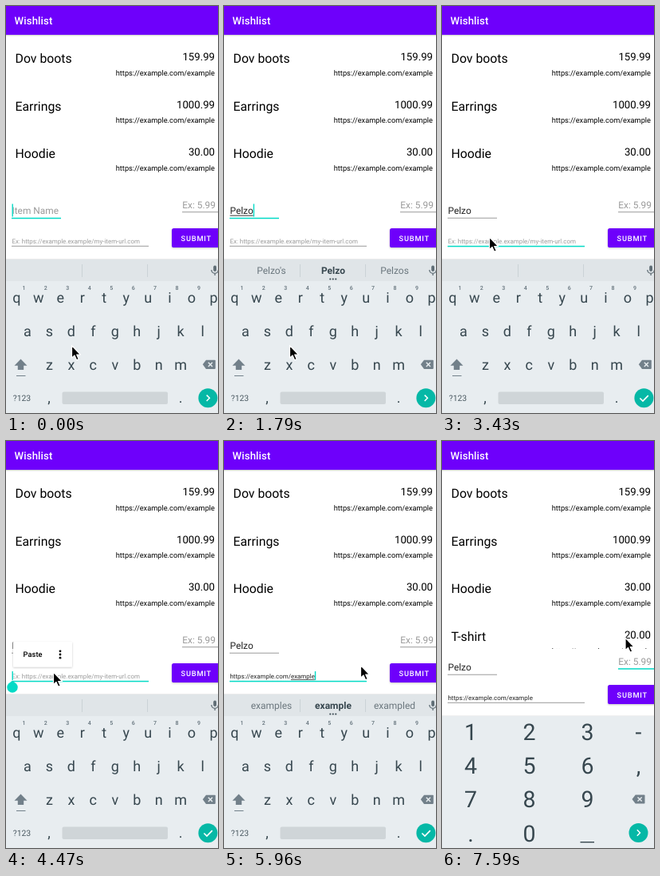
An HTML page that plays this animation: 266 by 509 pixels, repeating every 8 s.

```html
<!DOCTYPE html>
<html lang="en">
<head>
<meta charset="utf-8">
<title>Wishlist</title>
<style>
  html, body { margin: 0; width: 100%; height: 100%; overflow: hidden; background: #fff; }
  svg { display: block; width: 100vw; height: 100vh; font-family: Roboto, "Open Sans", sans-serif; }
  text { white-space: pre; text-rendering: geometricPrecision; }
  .mid { text-anchor: middle; }
  .end { text-anchor: end; }
  .medium { font-weight: 500; }
  .name { font-size: 15.84px; }
  .price { font-size: 13.2px; }
  .link { font-size: 9.24px; }
  .field { font-size: 11.9px; fill: #222; }
  .small { font-size: 7.92px; fill: #222; }
  .hint { fill: #9a9a9a; }
  .key { font-size: 18px; fill: #37474f; text-anchor: middle; }
  .digit { font-size: 7px; font-weight: 500; fill: #62717a; text-anchor: middle; }
  .num { font-size: 28.5px; fill: #37474f; text-anchor: middle; }
  .word { font-size: 12px; fill: #6b777e; text-anchor: middle; }
</style>
</head>
<body>
<svg id="stage" viewBox="0 0 266 509" preserveAspectRatio="none">
  <defs>
    <clipPath id="listClip"><rect id="listBox" y="36" width="266" height="197"/></clipPath>
    <filter id="soft" x="-20%" y="-30%" width="140%" height="160%">
      <feDropShadow dx="0" dy="1" stdDeviation="1" flood-opacity=".22"/>
    </filter>
    <g id="erase">
      <path d="M-8 0L-3.8-5.6H7.2Q8-5.6 8-4.8V4.8Q8 5.6 7.2 5.6H-3.8Z" fill="#72808a"/>
      <path d="M-1-2.6L4.2 2.6M4.2-2.6L-1 2.6" stroke="#e8edf0" stroke-width="1.4"/>
    </g>
  </defs>
  <rect width="266" height="509" fill="#fff"/>
  <g id="list" clip-path="url(#listClip)"></g>
  <rect y="36" width="266" height="1" fill="#000" opacity=".16"/>
  <rect y="37" width="266" height="1" fill="#000" opacity=".06"/>
  <rect width="266" height="36" fill="#6e00fb"/>
  <text x="10.5" y="22.5" class="medium" font-size="13.2" letter-spacing=".12" fill="#fff">Wishlist</text>

  <g id="form">
    <text id="nameHint" class="field hint" x="7.5" y="260">Item Name</text>
    <text id="nameText" class="field" x="7.5" y="260"></text>
    <rect id="nameMark" x="7.5" y="261.6" height="1" fill="#333"/>
    <rect id="nameLine" x="7" width="62"/>
    <text id="linkHint" class="small hint" x="7.5" y="296.8">Ex: https://example.example/my-item-url.com</text>
    <text id="linkText" class="small" x="7.5" y="296.8">https://example.com/example</text>
    <rect id="linkMark" y="298" height=".8" fill="#333"/>
    <rect id="linkLine" x="7" width="172"/>
    <text class="field hint" x="221.3" y="253.2">Ex: 5.99</text>
    <rect id="priceLine" x="221" width="50"/>
    <rect x="208" y="278" width="70" height="24" rx="2.6" fill="#6e00fb" filter="url(#soft)"/>
    <text x="219.5" y="293.6" class="medium" font-size="9.24" letter-spacing=".82" fill="#fff">SUBMIT</text>
    <rect id="caret" width="1.4" fill="#04dac6"/>
  </g>

  <g id="letters">
    <rect y="316" width="266" height="1" fill="#000" opacity=".08"/>
    <rect y="317" width="266" height="192" fill="#e8edf0"/>
    <rect y="317" width="266" height="27" fill="#e0e5e8"/>
    <path d="M95.5 323V339M177.5 323V339" stroke="#cbd2d6"/>
    <g fill="none" stroke="#5f6d75" stroke-width="1.3">
      <rect x="260.2" y="324.5" width="3.8" height="7.5" rx="1.9" fill="#5f6d75" stroke="none"/>
      <path d="M257.8 330A4.3 4.3 0 0 0 266.4 330M262.1 334.3V337"/>
    </g>
    <g id="words">
      <text class="word" x="59.5" y="335.3"></text>
      <text class="word" x="137" y="335.3" style="font-weight:700;fill:#37474f"></text>
      <text class="word" x="214" y="335.3"></text>
      <g fill="#37474f"><circle cx="133.3" cy="341.5" r="1.1"/><circle cx="136.8" cy="341.5" r="1.1"/><circle cx="140.3" cy="341.5" r="1.1"/></g>
    </g>
    <g id="keys"></g>
    <path d="M18.5 441.5L26.5 449.8H22.2V455H14.8V449.8H10.5Z" fill="#72808a"/>
    <rect x="13" y="462" width="11.5" height="1" fill="#72808a"/>
    <use href="#erase" x="254.8" y="448.3"/>
    <text x="20" y="493.5" class="mid" font-size="10.4" fill="#4b5a62">?123</text>
    <rect x="70.5" y="482.5" width="132.5" height="15.5" rx="2" fill="#cfd5d8"/>
    <text class="key" x="54" y="496">,</text>
    <text class="key" x="219" y="496">.</text>
    <circle cx="253.4" cy="490.3" r="12" fill="#05b8a6"/>
    <path id="next" d="M251.7 486.6L255.4 490.3L251.7 494" fill="none" stroke="#fff" stroke-width="1.5"/>
    <path id="done" d="M248.4 490.5L252 494.1L258.8 487.1" fill="none" stroke="#fff" stroke-width="1.6"/>
  </g>

  <g id="pad">
    <rect y="343" width="266" height="1" fill="#000" opacity=".06"/>
    <rect y="344" width="266" height="165" fill="#e8edf0"/>
    <g id="padKeys"></g>
    <rect x="173.5" y="501" width="17.5" height="1.4" fill="#37474f"/>
    <use href="#erase" x="246.5" y="448"/>
    <circle cx="246.5" cy="490" r="12" fill="#05b8a6"/>
    <path d="M244.8 486.3L248.5 490L244.8 493.7" fill="none" stroke="#fff" stroke-width="1.5"/>
  </g>

  <path id="handle" d="M8 299.8L12.9 303.5A6.7 6.7 0 1 1 3.1 303.5Z" fill="#04dac6"/>
  <g id="popup">
    <rect x="9" y="251" width="74" height="31.5" rx="1" fill="#fff" filter="url(#soft)"/>
    <text x="21.5" y="270" class="medium" font-size="9.24" letter-spacing=".1">Paste</text>
    <circle cx="68" cy="262.8" r="1.4"/><circle cx="68" cy="267" r="1.4"/><circle cx="68" cy="271.2" r="1.4"/>
  </g>
  <path id="mouse" d="M0 0V15.6L3.5 12.4L6.1 18.2L8.7 17.1L6.2 11.5H11Z" stroke="#fff" stroke-width="1.2" stroke-linejoin="round"/>
</svg>
<script>
const LOOP = 8000;
const $ = id => document.getElementById(id);
const set = (el, attrs) => { for (const k in attrs) el.setAttribute(k, attrs[k]); };
const show = (id, on) => { $(id).style.display = on ? '' : 'none'; };

function label(parent, cls, x, y, str) {
  const el = document.createElementNS('http://www.w3.org/2000/svg', 'text');
  set(el, { class: cls, x, y });
  el.textContent = str;
  parent.appendChild(el);
}

const items = [['Dov boots', '159.99'], ['Earrings', '1000.99'], ['Hoodie', '30.00'], ['T-shirt', '20.00']];
items.forEach(([name, price], i) => {
  const y = i * 59.7;
  label($('list'), 'name', 11.5, 70.8 + y, name);
  label($('list'), 'price end', 262, 67.8 + y, price);
  label($('list'), 'link end', 262, 86.6 + y, 'https://example.com/example');
});

const PITCH = 27.45;
[['qwertyuiop', 13.4], ['asdfghjkl', 27], ['zxcvbnm', 54.4]].forEach(([row, x0], r) => {
  [...row].forEach((ch, i) => {
    const x = x0 + i * PITCH;
    label($('keys'), 'key', x, 371 + r * 42, ch);
    if (!r && i < 9) label($('keys'), 'digit', x + 9, 355, i + 1);
  });
});
['123-', '456,', '789', '.0'].forEach((row, r) => {
  [...row].forEach((ch, i) => label($('padKeys'), 'num', [36, 109.5, 182.5, 246.5][i], 374 + r * 42.2, ch));
});

// Tracks hold each value until the next start time.
const typed = [[0, ''], [150, 'P'], [750, 'Pe'], [1200, 'Pel'], [1350, 'Pelz'], [1640, 'Pelzo']];
const guesses = [
  [0, null], [150, ['Please', 'P', 'Put']], [900, ['Pet', 'Pe', 'Petal']],
  [1350, ['Pelt', 'Pel', 'Pelts']], [1500, ['Pelts', 'Pelz', 'Pelt']],
  [1790, ["Pelzo's", 'Pelzo', 'Pelzos']], [3280, null],
  [5660, ['examples', 'example', 'exampled']]
];
const focus = [[0, 'name'], [3280, 'link'], [6840, 'price']];
const caretOn = [[0, true], [2240, false], [2830, true], [3280, false], [4020, true], [6110, false], [6550, true], [7590, false]];
const pointer = [
  [0, 82.5, 424.5], [1940, 140, 388], [2090, 243, 325], [2240, 194, 301], [2390, 171, 293], [2530, 155, 289],
  [2830, 112, 288], [2980, 78, 289], [3130, 59.5, 289],
  [4770, 55, 284], [4920, 42, 273], [5060, 30, 264], [5210, 25.5, 261.5],
  [5660, 60, 271], [5810, 128, 280], [5960, 171.5, 280.5], [6110, 192, 274],
  [6260, 212, 260], [6410, 225, 250], [6550, 230, 246]
];
const entry = (track, t) => track.reduce((last, e) => e[0] <= t ? e : last);
const at = (track, t) => entry(track, t)[1];

function line(id, y, active) {
  set($(id), { y, height: active ? 1.5 : 1, fill: active ? '#04dac6' : '#9b9b9b' });
}

function draw(t) {
  const name = at(typed, t), field = at(focus, t), words = at(guesses, t);
  const pasted = t >= 5510, numeric = t >= 7140;
  const popup = t >= 4470 && t < 5510;

  set($('listBox'), { height: numeric ? 224 : 197 });
  set($('form'), { transform: `translate(0 ${numeric ? 27 : 0})` });
  $('nameText').textContent = name;
  const nameWidth = name ? $('nameText').getComputedTextLength() : 0;
  show('nameHint', !name);
  show('nameMark', name && field === 'name');
  set($('nameMark'), { width: nameWidth });

  show('linkHint', !pasted);
  show('linkText', pasted);
  let linkWidth = 0;
  if (pasted) {
    const el = $('linkText');
    linkWidth = el.getComputedTextLength();
    const tail = el.getSubStringLength(20, 7);
    set($('linkMark'), { x: 7.5 + linkWidth - tail, width: tail });
  }
  show('linkMark', pasted && field === 'link');

  line('nameLine', 264.7, field === 'name');
  line('linkLine', 299.8, field === 'link');
  line('priceLine', 257.2, field === 'price');

  const [x, y, height] = {
    name: [7.5 + nameWidth, 247.5, 16],
    link: [7.5 + linkWidth, 288, 11],
    price: [221.2, 239.5, 17]
  }[field];
  set($('caret'), { x, y, height });
  show('caret', at(caretOn, t));

  show('letters', !numeric);
  show('pad', numeric);
  show('words', words);
  if (words) words.forEach((w, i) => { $('words').children[i].textContent = w; });
  show('next', field === 'name');
  show('done', field !== 'name');

  show('popup', popup);
  show('handle', popup);
  const [, mx, my] = entry(pointer, t);
  set($('mouse'), { transform: `translate(${mx} ${my})` });
}

const start = performance.now();
function tick() {
  draw((performance.now() - start) % LOOP);
  requestAnimationFrame(tick);
}
tick();
</script>
</body>
</html>
```
